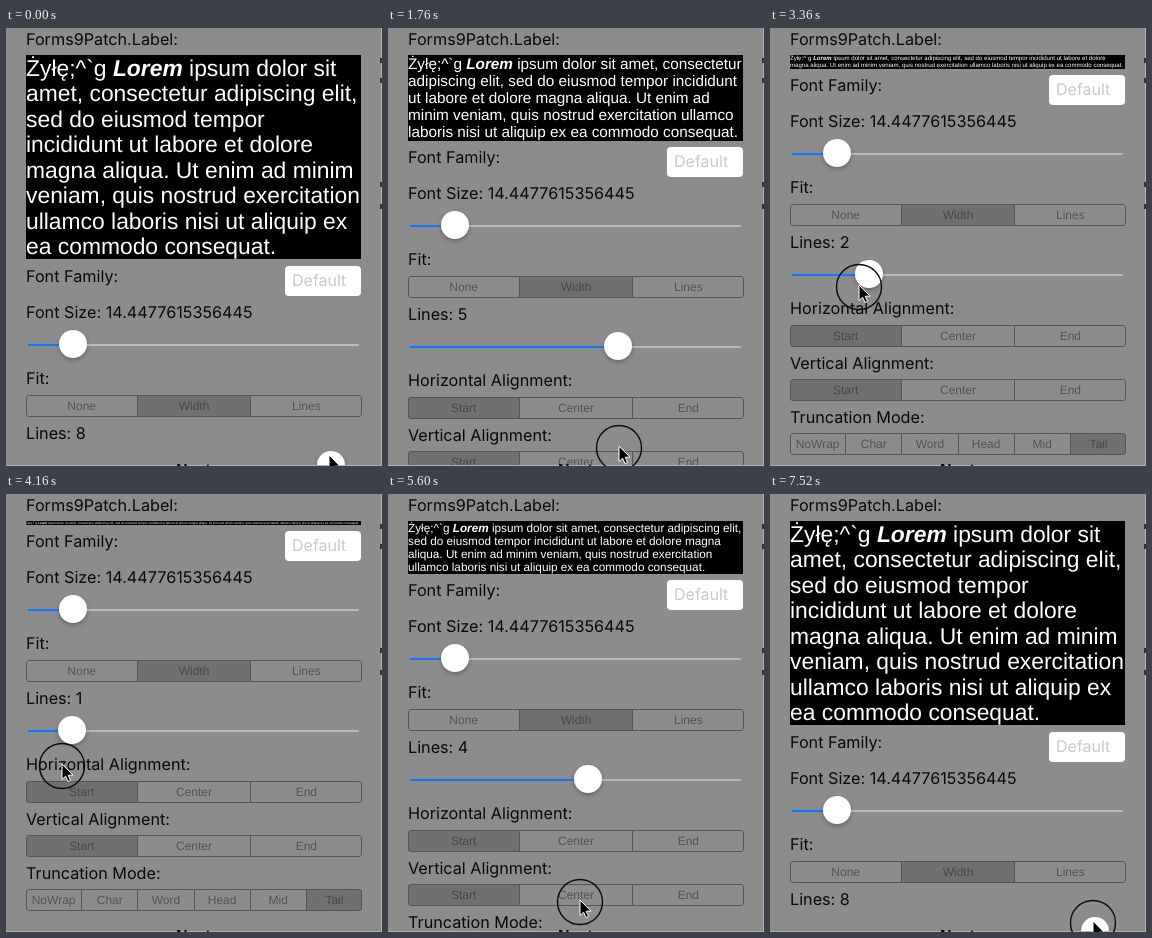
An HTML page that plays this animation: 376 px wide and 438 px high, repeating every 7680 ms.

```html
<!DOCTYPE html>
<html lang="en">
<head>
<meta charset="utf-8">
<title>Label fit demo</title>
<style>
  html, body { margin: 0; width: 100%; height: 100%; overflow: hidden; background: #8c8c8c; }
  #stage { position: relative; width: 376px; height: 438px; overflow: hidden; background: #8c8c8c;
    font-family: Inter, "Liberation Sans", sans-serif; color: #080808; text-rendering: geometricPrecision; }
  #stage div, #stage svg { position: absolute; }
  .cap { left: 20px; height: 20px; line-height: 20px; font-size: 16.2px; white-space: nowrap; }
  #label { left: 20px; top: 27px; width: 335px; background: #000; }
  #copy { left: 0; top: 1px; width: 335px; color: #fff; line-height: 1.115;
    font-family: "Liberation Sans", Arial, sans-serif; }
  #form { left: 0; top: 0; width: 376px; height: 400px; }
  #family { left: 279px; top: 7px; width: 69px; height: 30px; padding-left: 7px; border-radius: 4px;
    background: #fff; color: #c9c9ce; font-size: 16px; line-height: 29px; }
  .seg { left: 20px; width: 336px; height: 22px; display: flex; border-radius: 3px; overflow: hidden; }
  .seg::after { content: ""; position: absolute; inset: 0; border: 1px solid #555; border-radius: 3px; }
  .seg span { flex: 1; box-sizing: border-box; text-align: center; line-height: 22px; color: #535353;
    font-family: "Liberation Sans", Arial, sans-serif; font-size: 12px; }
  .seg span + span { border-left: 1px solid #555; }
  .seg .on { background: #707070; color: #484848; }
  .track { left: 22px; width: 331px; height: 2px; border-radius: 1px; background: #bababa; }
  .fill { left: 0; top: 0; height: 2px; background: #0a7aff; }
  .thumb { width: 28px; height: 28px; margin-left: -14px; border-radius: 50%;
    background: #fff; box-shadow: 0 2px 4px rgba(0, 0, 0, .28); }
  .tick { left: 374px; width: 2px; height: 5px; background: #333; }
  #next { left: 170px; top: 434px; font: bold 16px/18px "Liberation Sans", Arial, sans-serif; }
  #edge { left: 375px; top: 0; width: 1px; height: 438px; background: #b4b4b4; }
  #base { left: 0; top: 437px; width: 376px; height: 1px; background: #b4b0b2; }
  #pointer { left: 0; top: 0; overflow: visible; }
</style>
</head>
<body>
<div id="stage">
  <div class="cap" style="top:1px">Forms9Patch.Label:</div>
  <div id="label"><div id="copy">Żyłę;^`g <b><i>Lorem</i></b> ipsum dolor sit amet, consectetur adipiscing elit, sed do eiusmod tempor incididunt ut labore et dolore magna aliqua. Ut enim ad minim veniam, quis nostrud exercitation ullamco laboris nisi ut aliquip ex ea commodo consequat.</div></div>
  <div id="form"><div id="family">Default</div></div>
  <div id="edge"></div>
  <div id="base"></div>
  <div id="next">Next</div>
  <svg id="pointer" width="1" height="1">
    <circle id="ring" cx="0" cy="2" r="22.5" fill="none" stroke="#0a0a0a" stroke-width="1.4"/>
    <path d="M0 0V15.5L3.6 12.2L6 17.6L8.6 16.5L6.2 11.2H11Z" fill="#000" stroke="#fff" stroke-width="1"/>
  </svg>
</div>
<script>
  const $ = id => document.getElementById(id);
  const LOOP = 7680, STEP = 160, TOP = 27, LEADING = 1.115;
  // Font size that fits the copy into 1 to 8 lines
  const SIZES = [3.12, 6.09, 9.17, 11.75, 15.3, 17.5, 20.4, 22.85];
  // time, thumb x, pointer x, pointer y
  const KEYS = [
    [0, 325, 323, 427], [320, 325, 323, 427], [1760, 230, 231, 418], [3360, 99, 89, 257],
    [3840, 62, 52, 245], [4160, 66, 56, 270], [4800, 121, 112, 303], [5600, 200, 192, 406],
    [6400, 269, 273, 423], [6960, 310, 310, 427], [7200, 321, 319, 427], [7520, 325, 323, 427]
  ];

  function add(parent, cls, y, text = '') {
    const el = document.createElement('div');
    el.className = cls;
    el.style.top = y + 'px';
    el.textContent = text;
    parent.append(el);
    return el;
  }
  const form = $('form');
  const caption = (y, text) => add(form, 'cap', y - 10, text);

  function segments(y, names, picked) {
    const row = add(form, 'seg', y);
    names.split(' ').forEach(name => {
      const cell = document.createElement('span');
      cell.textContent = name;
      if (name === picked) cell.className = 'on';
      row.append(cell);
    });
  }

  function slider(y) {
    const track = add(form, 'track', y);
    const fill = add(track, 'fill', 0);
    const thumb = add(track, 'thumb', -14);
    return x => {
      fill.style.width = thumb.style.left = x - 22 + 'px';
    };
  }

  caption(17, 'Font Family:');
  caption(53, 'Font Size: 14.4477615356445');
  slider(85)(67);
  caption(119, 'Fit:');
  segments(136, 'None Width Lines', 'Width');
  const count = caption(174, '');
  const setLines = slider(206);
  caption(240, 'Horizontal Alignment:');
  segments(257, 'Start Center End', 'Start');
  caption(295, 'Vertical Alignment:');
  segments(311, 'Start Center End', 'Start');
  caption(349, 'Truncation Mode:');
  segments(365, 'NoWrap Char Word Head Mid Tail', 'Tail');
  [30, 50, 154, 176].forEach(y => add($('stage'), 'tick', y));

  function pose(t) {
    const i = KEYS.findIndex(k => k[0] > t);
    if (i < 0) return KEYS[KEYS.length - 1];
    const a = KEYS[i - 1], b = KEYS[i], p = (t - a[0]) / (b[0] - a[0]);
    return a.map((v, j) => v + (b[j] - v) * p);
  }

  function draw(t) {
    const [, x, px, py] = pose(t);
    const lines = Math.min(8, Math.max(1, Math.round((x - 36) / 37.75)));
    const size = SIZES[lines - 1];
    const height = lines * size * LEADING;
    $('copy').style.fontSize = size + 'px';
    $('label').style.height = Math.ceil(height) + 'px';
    form.style.top = Math.round(TOP - 0.2 + height) + 'px';
    count.textContent = 'Lines: ' + lines;
    setLines(Math.round(x));
    $('pointer').style.transform = `translate(${Math.round(px)}px, ${Math.round(py)}px)`;
    $('ring').style.visibility = t < STEP ? 'hidden' : 'visible';
  }

  const start = performance.now();
  function tick() {
    const t = (performance.now() - start) % LOOP;
    draw(Math.floor(t / STEP) * STEP);
    requestAnimationFrame(tick);
  }
  draw(0);
  requestAnimationFrame(tick);
</script>
</body>
</html>
```
